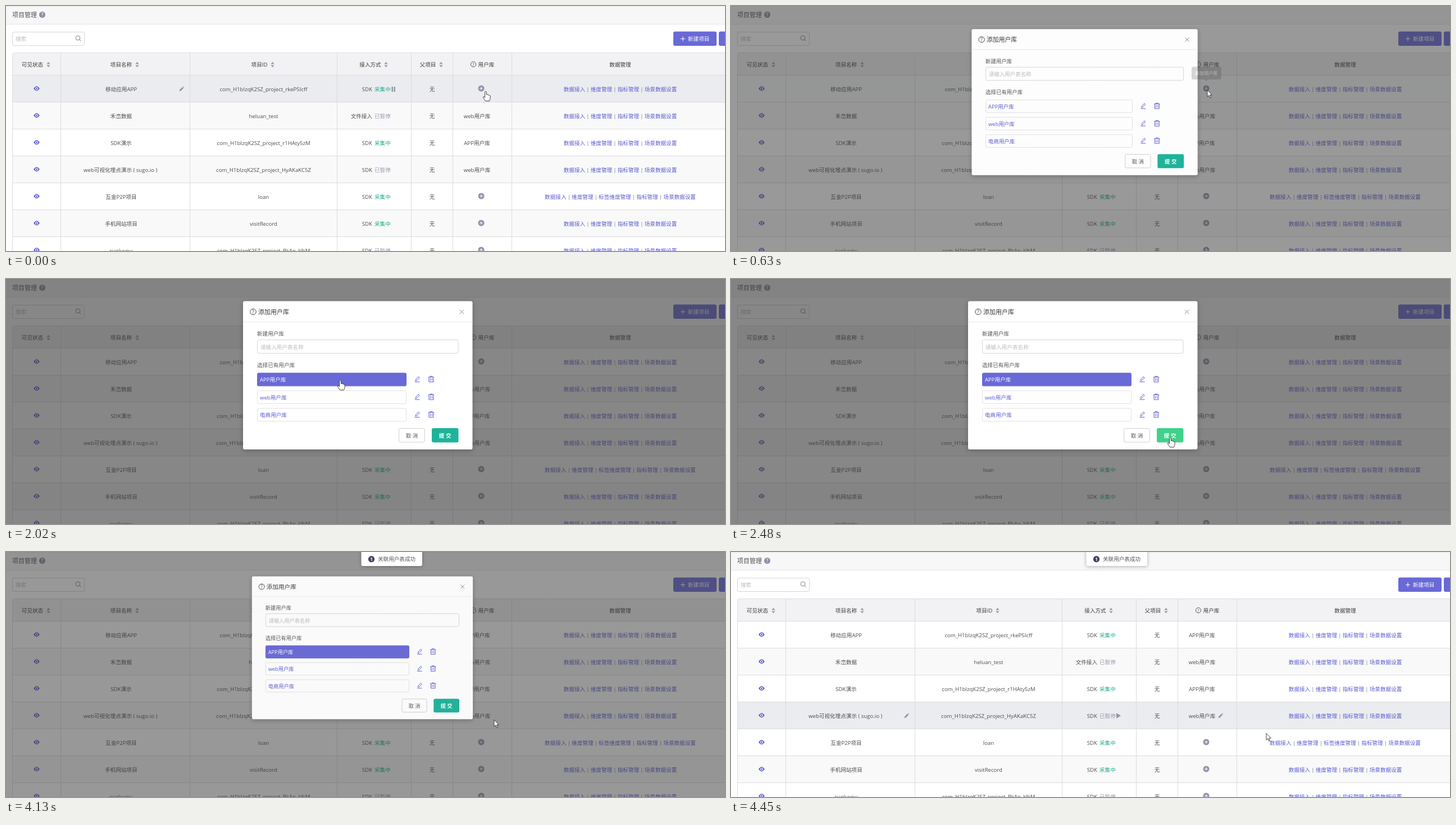
An HTML page with a canvas for the animation above (4520 ms loop, 1280 px wide and 437 px high).

```html
<!DOCTYPE html>
<html lang="zh-CN">
<head>
<meta charset="utf-8">
<title>项目管理</title>
<style>
html, body { margin: 0; width: 100%; height: 100%; overflow: hidden; background: #fff; }
canvas { display: block; width: 100vw; height: 100vh; }
</style>
</head>
<body>
<canvas id="stage" width="1280" height="437"></canvas>
<script>
const LOOP = 4520, STEPS = 58, TAU = Math.PI * 2;
const FONT = '"Open Sans", "Noto Sans CJK SC", "Noto Sans CJK", sans-serif';
const INK = '#4d4d4d', BLUE = '#5b5bd2', FILL = '#6969d7', GREY = '#9294ab', LINE = '#dcdcdc';
const screen2d = document.getElementById('stage').getContext('2d');
const layerCanvas = Object.assign(document.createElement('canvas'), { width: 1280, height: 437 });
const layer2d = layerCanvas.getContext('2d');
let ctx = screen2d;

// ---- helpers ----
const clamp = v => Math.min(1, Math.max(0, v));
const smooth = p => p * p * (3 - 2 * p);

function bezier(x1, y1, x2, y2) {
  const at = (a, b, p) => 3 * (1 - p) ** 2 * p * a + 3 * (1 - p) * p * p * b + p ** 3;
  return x => {
    if (x <= 0 || x >= 1) return clamp(x);
    let lo = 0, hi = 1;
    for (let i = 0; i < 24; i++) {
      const mid = (lo + hi) / 2;
      if (at(x1, x2, mid) < x) lo = mid; else hi = mid;
    }
    return at(y1, y2, lo);
  };
}
const easeOpen = bezier(.08, .82, .17, 1);
const easeClose = bezier(.78, .14, .15, .86);

function text(str, x, y, color = INK, align = 'left', size = 9.6, weight = 400) {
  ctx.font = `${weight} ${size}px ${FONT}`;
  ctx.textAlign = align;
  ctx.fillStyle = color;
  ctx.fillText(str, x, y + size * .38);
}

function rect(x, y, w, h, fill) {
  ctx.fillStyle = fill;
  ctx.fillRect(x, y, w, h);
}

function box(x, y, w, h, r, fill, stroke) {
  ctx.beginPath();
  ctx.roundRect(x, y, w, h, r);
  if (fill) { ctx.fillStyle = fill; ctx.fill(); }
  if (stroke) { ctx.strokeStyle = stroke; ctx.lineWidth = 1; ctx.stroke(); }
}

function disc(x, y, r, fill) {
  ctx.beginPath();
  ctx.arc(x, y, r, 0, TAU);
  ctx.fillStyle = fill;
  ctx.fill();
}

function ring(x, y, r, color, width = 1) {
  ctx.beginPath();
  ctx.arc(x, y, r, 0, TAU);
  ctx.strokeStyle = color;
  ctx.lineWidth = width;
  ctx.stroke();
}

function draw(path, x, y, { fill, stroke, width = 1 }) {
  ctx.save();
  ctx.translate(x, y);
  const shape = new Path2D(path);
  if (fill) { ctx.fillStyle = fill; ctx.fill(shape); }
  if (stroke) { ctx.strokeStyle = stroke; ctx.lineWidth = width; ctx.lineJoin = 'round'; ctx.stroke(shape); }
  ctx.restore();
}

function withShadow(color, blur, dy, paint) {
  ctx.save();
  ctx.shadowColor = color;
  ctx.shadowBlur = blur;
  ctx.shadowOffsetY = dy;
  paint();
  ctx.restore();
}

// Paints a group scaled about a point, then blends it as one layer.
function group(alpha, scale, ox, oy, paint) {
  if (alpha <= 0 || scale <= 0) return;
  ctx = layer2d;
  ctx.clearRect(0, 0, 1280, 437);
  ctx.save();
  ctx.translate(ox, oy);
  ctx.scale(scale, scale);
  ctx.translate(-ox, -oy);
  paint();
  ctx.restore();
  ctx = screen2d;
  ctx.globalAlpha = alpha;
  ctx.drawImage(layerCanvas, 0, 0);
  ctx.globalAlpha = 1;
}

// ---- icons ----
const SHAPES = {
  plus: 'M-4 0H4M0 -4V4',
  cross: 'M-3.6 -3.6L3.6 3.6M3.6 -3.6L-3.6 3.6',
  sort: 'M-3.2 -1L0 -4.8L3.2 -1ZM-3.2 1L0 4.8L3.2 1Z',
  pencil: 'M-4 4L-3.4 1.4L1.6 -3.6L3.6 -1.6L-1.4 3.4ZM2.2 -4.2L3 -4.8L4.8 -3L4.2 -2.2Z',
  edit: 'M-3 3L-2.4 .6L2.2 -4.4L4.2 -2.6L-.6 2.4ZM-4.5 5H4.5',
  trash: 'M-5.2 -3.6H5.2M-2 -3.6V-5.2H2V-3.6M-4 -3.6V5H4V-3.6M-1.5 -1.5V3M1.5 -1.5V3',
  eye: 'M-5.3 0Q0 -8 5.3 0Q0 8 -5.3 0Z',
  play: 'M-4 -4.8L4.2 0L-4 4.8Z',
  arrow: 'M0 0V11.8L2.7 9.3L4.6 13.8L6.5 13L4.6 8.6H8.3Z',
  hand: 'M-1.4 1.2Q0 -1 1.4 1.2V6Q4 5 4.2 6.8Q6.4 6 6.6 7.7Q8.5 7.4 8.3 9.6L8 13.2L6.5 17.5H-.5L-4.5 11.6Q-5 9.2 -2.8 9.8L-1.4 11.4Z'
};

function helpRing(x, y, r, color) {
  ring(x, y, r, color);
  text('?', x, y, color, 'center', r * 1.7);
}

function eye(x, y) {
  draw(SHAPES.eye, x, y, { fill: BLUE });
  disc(x, y, 2.5, '#fff');
  disc(x, y, 1.4, BLUE);
}

function plusDisc(x, y) {
  disc(x, y, 5.5, GREY);
  draw('M-2.8 0H2.8M0 -2.8V2.8', x, y, { stroke: '#fff', width: 1.1 });
}

// ---- page ----
const COLUMNS = [97.5, 327.5, 589.5, 721.5, 795.5, 900.5];
const HEADERS = [['可见状态', 47, 75.5], ['项目名称', 205, 233.5], ['项目ID', 451, 474.5],
  ['接入方式', 648.5, 676.5], ['父项目', 751, 774.5], ['用户库', 855], ['数据管理', 1093.5]];
const ID = 'com_H1bIzqK2SZ_project_';
// name, id, access, collecting, user library
const ROWS = [
  ['移动应用APP', ID + 'rkeP5Icff', 'SDK', true, ''],
  ['禾峦数据', 'heluan_test', '文件接入', false, 'web用户库'],
  ['SDK演示', ID + 'r1HAty5zM', 'SDK', true, 'APP用户库'],
  ['web可视化埋点演示 ( sugo.io ) ', ID + 'HyAKaKC5Z', 'SDK', false, 'web用户库'],
  ['互金P2P项目', 'loan', 'SDK', true, ''],
  ['手机网站项目', 'visitRecord', 'SDK', true, ''],
  ['suoluyou', ID + 'BkAp_klkM', 'SDK', false, '']
];
const LINKS = ['数据接入', '维度管理', '指标管理', '场景数据设置'];
const LINKS_TAGGED = ['数据接入', '维度管理', '标签维度管理', '指标管理', '场景数据设置'];

function links(items, y) {
  const em = 9.6, width = items.join('').length * em + (items.length - 1) * em;
  let x = 1093.5 - width / 2;
  items.forEach((label, i) => {
    if (i) text('|', x - em / 2, y, '#777', 'center');
    text(label, x, y, BLUE);
    x += (label.length + 1) * em;
  });
}

function tableRow(row, i, step) {
  const [name, id, access, collecting, library] = row;
  const y = 148 + 48 * i, top = y - 24;
  rect(12, top, 1268, 48, i % 2 ? '#f8f9f8' : '#fff');
  const hover = i === 0 ? clamp(1 - (step - 6) / 3) : i === 3 && step >= 56 ? 1 : 0;
  if (hover) {
    ctx.globalAlpha = hover;
    rect(12, top, 1268, 48, '#ebecef');
    ctx.globalAlpha = 1;
  }
  const tools = hover === 1 && (i === 3 || step < 6);
  eye(54.5, y - .7);
  text(name, 205, y, INK, 'center');
  text(id, 458.5, y, INK, 'center');
  text(access, 652, y, INK, 'right');
  text(collecting ? '采集中' : '已暂停', 656, y, collecting ? '#25ad94' : '#9a9bb2');
  text('无', 758.5, y, INK, 'center');
  const shown = i === 0 && step >= 40 ? 'APP用户库' : library;
  if (shown) text(shown, 838.5, y, INK, 'center');
  else plusDisc(846, y - 1);
  links(i === 4 ? LINKS_TAGGED : LINKS, y);
  if (!tools) return;
  draw(SHAPES.pencil, 312.5, y, { fill: GREY });
  if (collecting) {
    rect(686.5, y - 4, 2.4, 9, GREY);
    rect(690.5, y - 4, 2.4, 9, GREY);
  } else {
    draw(SHAPES.play, 690, y, { fill: GREY });
    draw(SHAPES.pencil, 871.5, y, { fill: GREY });
  }
}

function page(step) {
  rect(0, 0, 1280, 437, '#fff');
  rect(0, 0, 1280, 33, '#f7f7f7');
  rect(0, 0, 1280, 1, '#e8e8e8');
  rect(0, 32, 1280, 1, '#e6e6e6');
  text('项目管理', 11, 16, INK, 'left', 11);
  disc(64.5, 15.5, 5.5, '#8c8da6');
  text('?', 64.5, 15.5, '#fff', 'center', 8.5, 600);

  box(11.5, 46.5, 128, 24, 2.5, '#fff', '#d5d5d5');
  text('搜索', 17, 58.5, '#bcbcbc');
  ring(128, 57, 3.9, '#777', .9);
  draw('M0 0L2.6 2.6', 130.8, 59.8, { stroke: '#777' });

  box(1188, 45.5, 77, 25.5, 3, FILL);
  draw(SHAPES.plus, 1205, 58.5, { stroke: '#fff', width: 1.1 });
  text('新建项目', 1214, 58.5, '#fff');
  box(1269, 45.5, 30, 25.5, 3, FILL);

  box(11.5, 83.5, 1300, 420, [4, 0, 0, 0], '#f2f2f4', LINE);
  HEADERS.forEach(([label, x, sort]) => {
    text(label, x, 104.3, '#3a3a3a', 'center', 9.6, 500);
    if (sort) draw(SHAPES.sort, sort, 104.5, { fill: '#9899a4' });
  });
  helpRing(832, 104, 4.6, '#555');
  ROWS.forEach((row, i) => tableRow(row, i, step));
  for (let i = 0; i < 7; i++) rect(11, 123 + 48 * i, 1269, 1, LINE);
  COLUMNS.forEach(x => rect(x - .5, 84, 1, 353, LINE));
}

// ---- overlays ----
function modal(step) {
  withShadow('rgba(0,0,0,.25)', 8, 2, () => box(422, 39.5, 408.5, 264.5, 3, '#fff'));
  helpRing(440, 58.5, 5.2, '#444');
  text('添加用户库', 449, 58.5, '#383838', 'left', 11, 500);
  draw(SHAPES.cross, 811.5, 58.5, { stroke: '#888' });
  rect(422, 76, 408.5, 1, '#e9e9e9');

  text('新建用户库', 447, 97.3, '#555');
  box(447.5, 108.5, 357.5, 24, 3, '#fff', '#d6d6d6');
  text('请输入用户表名称', 453, 121, '#bcbcbc');
  text('选择已有用户库', 447, 153.3, '#555');
  ['APP用户库', 'web用户库', '电商用户库'].forEach((label, i) => {
    const y = 179.3 + 31.5 * i, selected = i === 0 && step >= 22;
    box(447.5, y - 11.5, 265, 23, 2, selected ? FILL : '#fff', selected ? FILL : '#e2e2e2');
    text(label, 452, y + .3, selected ? '#fff' : BLUE, 'left', 9.6, 500);
    draw(SHAPES.edit, 732, y - .8, { stroke: BLUE });
    draw(SHAPES.trash, 757, y - .6, { stroke: BLUE });
  });

  box(699.5, 266.5, 46, 24.5, 3, '#fff', '#cfcfcf');
  text('取 消', 722.5, 279.2, '#555', 'center');
  box(758, 266, 47.5, 25.5, 3, step >= 31 && step < 53 ? '#41d18c' : '#1fb39b');
  text('提 交', 781.7, 279.2, '#fff', 'center', 9.6, 700);
}

function tooltip() {
  box(815, 103.5, 63, 27, 3, '#373739');
  draw('M-4 0H4L0 4Z', 846, 130, { fill: '#373739' });
  text('添加用户库', 846, 117.7, '#fff', 'center', 9.6, 700);
}

function toast() {
  withShadow('rgba(0,0,0,.3)', 6, 1, () => box(632.5, -6, 108.5, 31, 3, '#fff'));
  disc(650.5, 12.7, 5.6, '#433f61');
  text('1', 650.5, 12.7, '#fff', 'center', 8, 700);
  text('关联用户表成功', 662, 12.7, '#555');
}

// step, x, y, hand pointer
const POINTER = [
  [0, 854, 152, 1], [4, 853, 151, 1], [6, 848, 150, 0], [12, 848, 150, 0], [19, 595, 180, 0],
  [20, 594, 179, 1], [25, 594, 179, 1], [26, 595, 180.5, 1], [32, 782, 282.5, 1], [52, 782, 282.5, 1],
  [53, 869, 299.5, 0], [57, 953, 323.5, 0]
];

function pointer(step) {
  const i = POINTER.findLastIndex(key => key[0] <= step);
  const from = POINTER[i], to = POINTER[i + 1] || from;
  const p = to === from ? 0 : smooth((step - from[0]) / (to[0] - from[0]));
  const x = from[1] + (to[1] - from[1]) * p, y = from[2] + (to[2] - from[2]) * p;
  draw(from[3] ? SHAPES.hand : SHAPES.arrow, x, y, { fill: '#fff', stroke: '#222', width: .85 });
}

function render(step) {
  page(step);

  const opened = (step - 6) * 78 + 42, closed = (step - 53) * 78 + 43;
  if (step >= 6 && step < 57) {
    const closing = step >= 53;
    const fade = closing ? clamp(1 - closed / 300) : clamp((opened - 9) / 222);
    rect(0, 0, 1280, 437, `rgba(55,55,55,${.6 * fade})`);
    const size = closing ? 1 - easeClose(closed / 300) : easeOpen(opened / 300);
    group(size, size, 846, 149, () => modal(step));
  }

  const tip = step <= 6 ? clamp(step / 4) : clamp(1 - (step - 6) * .4);
  group(tip, .8 + .2 * tip, 846, 134, tooltip);

  if (step >= 40) {
    const p = easeOpen(clamp((step - 39.8) / 2.2));
    ctx.save();
    ctx.globalAlpha = p;
    ctx.translate(0, -28 * (1 - p));
    toast();
    ctx.restore();
  }
  pointer(step);
}

function tick(now) {
  render(Math.min(STEPS - 1, Math.floor((now % LOOP + 18) * STEPS / LOOP)));
  requestAnimationFrame(tick);
}
requestAnimationFrame(tick);
</script>
</body>
</html>
```
